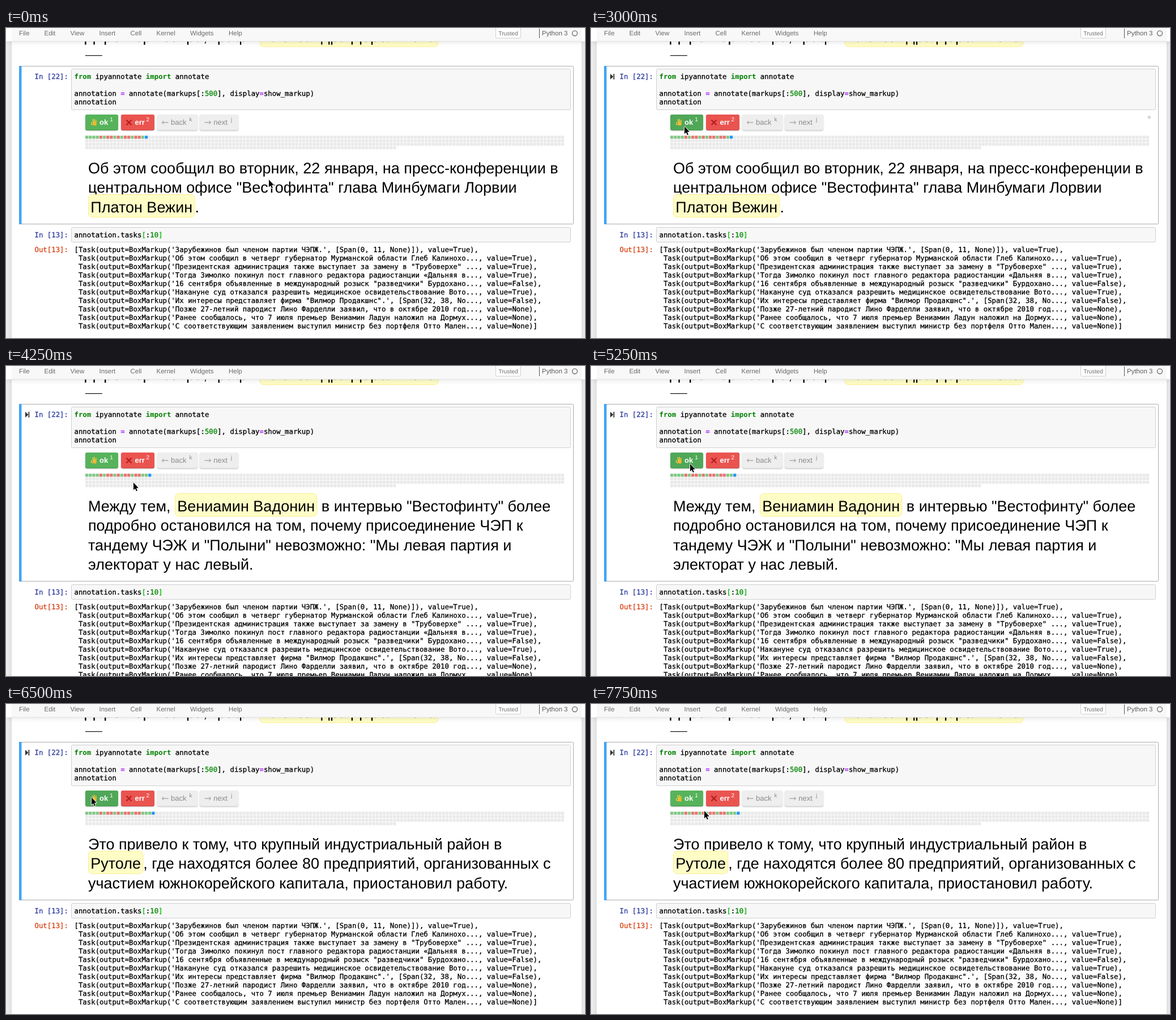
Animation, 1022 px wide and 548 px high, one loop 8 s. Source, as an HTML page with a canvas:

```html
<!DOCTYPE html>
<html lang="ru">
<head>
<meta charset="utf-8">
<title>Annotation notebook</title>
<style>
html, body { margin: 0; width: 100%; height: 100%; overflow: hidden; background: #fff; }
canvas { display: block; width: 1022px; height: 548px; }
</style>
</head>
<body>
<canvas id="stage" width="1022" height="548"></canvas>
<script>
const ctx = document.getElementById('stage').getContext('2d');
const W = 1022, H = 548, LOOP = 8000, STEP = 250;
const SANS = '"Liberation Sans", Arial, sans-serif';
const MONO = '12.35px "DejaVu Sans Mono", monospace';
const BIG = '27px ' + SANS;
const LINE = 34.4;
const MARKS = 'ggggrgrrgrgrrgrrgggg';
const MARK_COLORS = { g: '#81c784', r: '#e57373' };

// Cursor tip: time, x, y
const PATH = [
  [0, 464, 268], [250, 440, 267], [500, 400, 265], [750, 365, 263], [1000, 348, 262],
  [1250, 340, 256], [1500, 300, 240], [2000, 168, 174], [2250, 146, 163],
  [2750, 163, 173], [3000, 165, 174], [3500, 165, 174], [4000, 205, 200],
  [4250, 225, 206], [4750, 192, 178], [5250, 175, 173], [5750, 151, 165],
  [6500, 151, 165], [7000, 176, 182], [7500, 198, 189], [7750, 200, 189]
];

// Arrays hold mixed lines; an object is a highlighted name
const SCENES = [
  { start: 0, lines: [
    ['Об этом сообщил во вторник, 22 января, на пресс-конференции в'],
    ['центральном офисе "Вестофинта" глава Минбумаги Лорвии'],
    [{ name: 'Платон Вежин' }, '.']
  ] },
  { start: 3250, lines: [
    ['Между тем, ', { name: 'Вениамин Вадонин' }, ' в интервью "Вестофинту" более'],
    ['подробно остановился на том, почему присоединение ЧЭП к'],
    ['тандему ЧЭЖ и "Полыни" невозможно: "Мы левая партия и'],
    ['электорат у нас левый.']
  ] },
  { start: 6500, lines: [
    ['Это привело к тому, что крупный индустриальный район в'],
    [{ name: 'Рутоле' }, ', где находятся более 80 предприятий, организованных с'],
    ['участием южнокорейского капитала, приостановил работу.']
  ] }
];

const TASKS = [
  ["'Зарубежинов был членом партии ЧЭПЖ.', [Span(0, 11, None)])", 'True'],
  ["'Об этом сообщил в четверг губернатор Мурманской области Глеб Калинохо...", 'True'],
  ["'Президентская администрация также выступает за замену в \"Трубоверхе\" ...", 'True'],
  ["'Тогда Зимолко покинул пост главного редактора радиостанции «Дальняя в...", 'True'],
  ["'16 сентября объявленные в международный розыск \"разведчики\" Бурдохано...", 'False'],
  ["'Накануне суд отказался разрешить медицинское освидетельствование Вото...", 'True'],
  ["'Их интересы представляет фирма \"Вилмор Продакшнс\".', [Span(32, 38, No...", 'False'],
  ["'Позже 27-летний пародист Лино Фарделли заявил, что в октябре 2010 год...", 'None'],
  ["'Ранее сообщалось, что 7 июля премьер Вениамин Ладун наложил на Дормух...", 'None'],
  ["'С соответствующим заявлением выступил министр без портфеля Отто Мален...", 'None']
];

function text(str, x, y, font, color = '#000', align = 'left') {
  ctx.font = font;
  ctx.fillStyle = color;
  ctx.textAlign = align;
  ctx.fillText(str, x, y);
  return ctx.measureText(str).width;
}

// Regular weight gets a hairline outline for a slightly heavier face
function mono(str, x, y, color = '#000', bold = false) {
  const width = text(str, x, y, (bold ? 'bold ' : '') + MONO, color);
  if (!bold) {
    ctx.strokeStyle = color;
    ctx.lineWidth = 0.3;
    ctx.strokeText(str, x, y);
  }
  return width;
}

function rect(x, y, w, h, color) {
  ctx.fillStyle = color;
  ctx.fillRect(x, y, w, h);
}

function panel(x, y, w, h, r, fill, border) {
  ctx.beginPath();
  ctx.roundRect(x, y, w, h, r);
  ctx.fillStyle = fill;
  ctx.fill();
  if (border) {
    ctx.strokeStyle = border;
    ctx.lineWidth = 1;
    ctx.stroke();
  }
}

function poly(points, fill) {
  ctx.beginPath();
  points.forEach(([x, y]) => ctx.lineTo(x, y));
  ctx.closePath();
  ctx.fillStyle = fill;
  ctx.fill();
}

function stroke(points, color, width) {
  ctx.beginPath();
  points.forEach(([x, y], i) => i ? ctx.lineTo(x, y) : ctx.moveTo(x, y));
  ctx.strokeStyle = color;
  ctx.lineWidth = width;
  ctx.stroke();
}

function shadow(color, blur, dy = 0) {
  ctx.shadowColor = color;
  ctx.shadowBlur = blur;
  ctx.shadowOffsetY = dy;
}

function noShadow() {
  shadow('transparent', 0);
}

function code(parts, y) {
  let x = 120.5;
  for (const [str, color, bold] of parts) x += mono(str, x, y, color, bold);
}

function richLine(parts, x, y) {
  for (const part of parts) {
    if (typeof part === 'string') {
      x += text(part, x, y, BIG);
      continue;
    }
    ctx.font = BIG;
    const w = ctx.measureText(part.name).width + 8.6;
    panel(x + 0.5, y - 31.2, w - 1, 40, 6.5, '#fffdc6', '#fbee8c');
    text(part.name, x + 4.3, y, BIG);
    x += w;
  }
}

function page() {
  rect(0, 0, W, H, '#f0f0f0');
  shadow('rgba(87,87,87,.22)', 11);
  rect(10, -20, 1006, H + 40, '#fff');
  noShadow();
}

function header() {
  richLine(['Директор театра, граф'], 139, 24.2);
  richLine([{ name: 'Александра Дореликова' }], 447.5, 24.2);
  mono('––––', 140, 51.5);

  shadow('rgba(87,87,87,.2)', 9);
  rect(0, -10, W, 33.5, '#fff');
  noShadow();
  rect(10, 0, 1006, 23, '#f8f8f8');
  rect(10, 23, 1006, 1, '#e4e4e4');

  const menu = { File: 23, Edit: 67.5, View: 113.5, Insert: 164.5, Cell: 219.5, Kernel: 265.5, Widgets: 325, Help: 393 };
  const font = '11.5px ' + SANS;
  for (const item in menu) text(item, menu[item], 13.3, font, '#6a6a6a');
  panel(864.5, -3.5, 44, 21.5, 2, '#fff', '#cfcfcf');
  text('Trusted', 886.5, 13, '10.3px ' + SANS, '#6f6f6f', 'center');
  rect(941, 1, 1, 17, '#555');
  text('Python 3', 946, 13.3, font, '#5c5c5c');
  ctx.beginPath();
  ctx.arc(1004, 9.3, 4.5, 0, 7);
  ctx.strokeStyle = '#666';
  ctx.lineWidth = 1.3;
  ctx.stroke();
}

function button(x, w, fill, edge) {
  shadow('rgba(0,0,0,.22)', 2.5, 1);
  panel(x, 153, w, 28, 3.5, edge);
  noShadow();
  panel(x, 153, w, 27, 3.5, fill);
}

function okHand() {
  ctx.lineCap = 'round';
  stroke([[155.2, 167], [153, 162]], '#ffd24a', 1.5);
  stroke([[157, 167], [156, 161.3]], '#ffcb3d', 1.5);
  stroke([[158.8, 168], [159.2, 163]], '#fbbf2d', 1.5);
  ctx.beginPath();
  ctx.ellipse(156.8, 169.6, 3.2, 2.8, 0.6, 0, 7);
  ctx.fillStyle = '#f5b32b';
  ctx.fill();
  ctx.beginPath();
  ctx.arc(152.6, 169, 2.1, 0, 7);
  ctx.strokeStyle = '#fcc93f';
  ctx.lineWidth = 1.3;
  ctx.stroke();
  ctx.lineCap = 'butt';
}

function arrow(tip, tail) {
  const d = Math.sign(tail - tip) * 3;
  stroke([[tail, 167], [tip, 167]], '#8b8b8b', 1);
  stroke([[tip + d, 164.2], [tip, 167], [tip + d, 169.8]], '#8b8b8b', 1);
}

function buttons(mouse) {
  const over = (x, w) => mouse.x >= x && mouse.x < x + w && mouse.y >= 153 && mouse.y < 181;
  const bold = 'bold 13px ' + SANS, plain = '13px ' + SANS, sup = '10px ' + SANS;

  button(140, 58, over(140, 58) ? '#50a758' : '#56b35b', '#459a4b');
  okHand();
  text('ok', 165, 171, bold, '#fff');
  text('1', 183.3, 164.7, sup, '#fff');

  button(203, 59, over(203, 59) ? '#e24f4d' : '#ea5450', '#cf4a47');
  stroke([[212.5, 162.5], [221.5, 171.5]], '#b71c1c', 2.2);
  stroke([[221.5, 162.5], [212.5, 171.5]], '#b71c1c', 2.2);
  text('err', 227.5, 171, bold, '#fff');
  text('2', 247.5, 164.7, sup, '#fff');

  button(267, 71, '#eee', '#dcdcdc');
  arrow(275.5, 286.5);
  text('back', 291, 171, plain, '#8b8b8b');
  text('k', 323.5, 164.7, sup, '#8b8b8b');

  button(342, 68, '#eee', '#dcdcdc');
  arrow(361.5, 350.5);
  text('next', 366.3, 171, plain, '#8b8b8b');
  text('j', 397, 164.7, sup, '#8b8b8b');
}

function progress(current) {
  const pitch = 6.174, perRow = 137;
  for (let i = 0; i < 500; i++) {
    const color = i < current ? MARK_COLORS[MARKS[i]] : i === current ? '#2196f3' : '#e9e9e9';
    rect(140 + (i % perRow) * pitch, 190.4 + Math.floor(i / perRow) * pitch, 5.3, 5.3, color);
  }
}

function activeCell(scene, index, mouse, hovered) {
  const bottom = 347 + (scene.lines.length - 3) * 34;
  panel(23.5, 67.5, 978, bottom - 68, 1, '#fff', '#ababab');
  rect(23, 67, 4.5, bottom - 67, '#42a5f5');
  panel(115.5, 72.5, 881, 72, 2, '#f7f7f7', '#cfcfcf');
  mono('In [22]:', 50.5, 89.7, '#303f9f');

  const key = '#008000';
  code([['from', key, true], [' ipyannotate '], ['import', key, true], [' annotate']], 89.7);
  code([['annotation '], ['=', '#aa22ff', true], [' annotate(markups[:'], ['500', '#008800'],
    ['], display'], ['=', '#aa22ff', true], ['show_markup)']], 119.7);
  code([['annotation']], 134.7);

  if (hovered) {
    poly([[34, 81], [39.5, 86], [34, 91]], '#333');
    rect(39.5, 81, 1.8, 10, '#333');
  }
  // The output toggle goes away with the first answer
  if (hovered && index === 0) {
    ctx.beginPath();
    ctx.arc(985.3, 157.8, 2.8, 0, 7);
    ctx.fillStyle = '#d6d6d6';
    ctx.fill();
  }

  buttons(mouse);
  progress(17 + index);
  scene.lines.forEach((parts, i) => richLine(parts, 145, 256.8 + i * LINE));
}

function outputCell(dy) {
  panel(115.5, 352.5 + dy, 881, 26, 2, '#f7f7f7', '#cfcfcf');
  mono('In [13]:', 50.5, 370 + dy, '#303f9f');
  code([['annotation.tasks'], ['[', '#00bb00'], [':'], ['10', '#008800'], [']', '#00bb00']], 370 + dy);
  mono('Out[13]:', 50.5, 396 + dy, '#d84315');
  TASKS.forEach(([body, value], i) => {
    const open = i ? ' ' : '[';
    const close = i < TASKS.length - 1 ? '),' : ')]';
    code([[`${open}Task(output=BoxMarkup(${body}, value=${value}${close}`]], 396.3 + dy + i * 15);
  });
}

function pointer({ x, y }) {
  const shape = [[0, 0], [0, 13.2], [2.9, 10.5], [5, 15.3], [6.9, 14.4], [4.9, 9.8], [8.8, 9.5]]
    .map(([px, py]) => [x + px, y + py]);
  ctx.lineJoin = 'round';
  stroke([...shape, shape[0]], '#fff', 1.8);
  ctx.lineJoin = 'miter';
  poly(shape, '#000');
}

function mouseAt(t) {
  const next = PATH.findIndex(p => p[0] > t);
  if (next < 0) {
    const [, x, y] = PATH[PATH.length - 1];
    return { x, y };
  }
  const [t0, x0, y0] = PATH[next - 1], [t1, x1, y1] = PATH[next];
  const k = (t - t0) / (t1 - t0);
  return { x: x0 + (x1 - x0) * k, y: y0 + (y1 - y0) * k };
}

function draw(t) {
  const mouse = mouseAt(t);
  const index = SCENES.filter(s => s.start <= t).length - 1;
  const scene = SCENES[index];
  ctx.textRendering = 'geometricPrecision';
  page();
  header();
  activeCell(scene, index, mouse, t >= 250);
  outputCell((scene.lines.length - 3) * 34);
  pointer(mouse);
}

const begin = performance.now();
function frame() {
  const t = (performance.now() - begin) % LOOP;
  draw(Math.floor(t / STEP) * STEP);
  requestAnimationFrame(frame);
}
frame();
</script>
</body>
</html>
```
